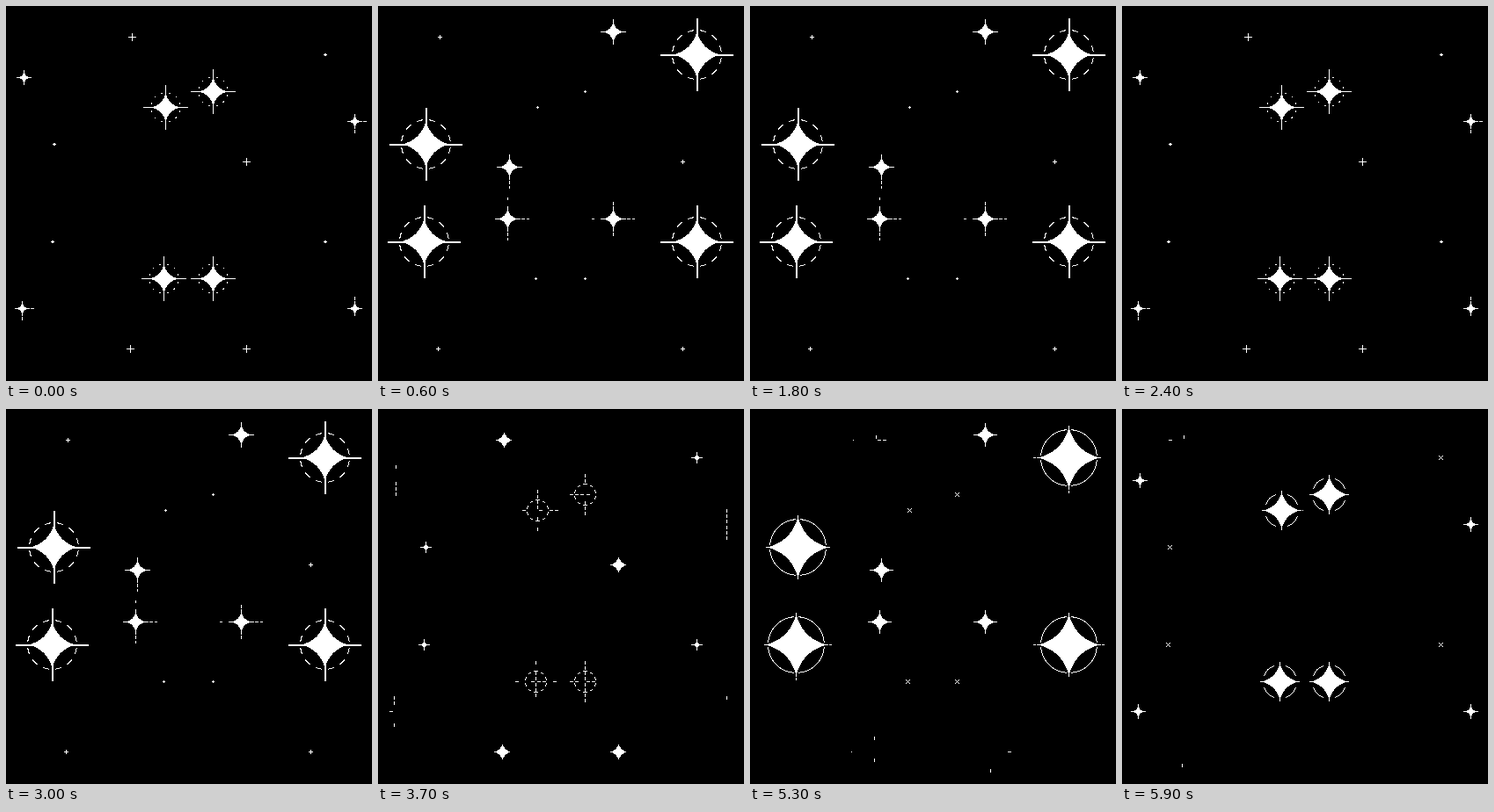
An HTML page for the animation above (6010 ms loop, 416 by 427 pixels).

```html
<!DOCTYPE html>
<html lang="en">
<head>
<meta charset="utf-8">
<title>Twinkling stars</title>
<style>
  html, body { margin: 0; width: 100%; height: 100%; overflow: hidden; background: #000; }
  svg { display: block; width: 416px; height: 427px; shape-rendering: crispEdges; }
</style>
</head>
<body>
<svg viewBox="0 0 416 427">
  <path id="solid" fill="#fff"/>
  <path id="rings" fill="none" stroke="#fff"/>
</svg>
<script>
const LOOP = 6010, STEP = 100, PHASES = 12, LAST = 59;

// Poses per phase; lengths are for scale 1.
const BIG = [
  { core: 2, bend: .5 },
  { core: 4, bend: .3, ray: 6 },
  { core: 9, ray: 12 },
  { core: 14, ray: 20 },
  { core: 21, bend: .17, ray: 26, dash: 40, keep: .7, ring: 25, arcs: 8, fill: .13 },
  { core: 35, ray: 36, dash: 40, keep: .3, ring: 32, arcs: 4, fill: .9 },
  { core: 27, ray: 41, ring: 28, arcs: 12, fill: .5 },
  { dash: 43, keep: .8, ring: 20, arcs: 10, fill: .9 },
  { dash: 41, keep: .5, ring: 12, arcs: 8, fill: .7 },
  { ray: 9 },
  { ray: 6 },
  { cross: 2 }
];
const SMALL = [
  {}, {}, {},
  { ray: 3 },
  { core: 7.5, bend: .25 },
  { core: 11, ray: 13 },
  { core: 11, ray: 14, dash: 24, keep: .6 },
  { dash: 30, keep: .45 },
  { dash: 22, keep: .2 },
  {}, {}, {}
];

const STARS = [
  { x: 235, y: 310, poses: BIG, size: .6, shift: 6 },
  { x: 362, y: 268, poses: BIG, size: 1, shift: 0 },
  { x: 267, y: 242, poses: SMALL, size: 1, shift: 0 },
  { x: 396, y: 344, poses: SMALL, size: .6, shift: 6 },
  { x: 273, y: 390, poses: SMALL, size: 1.2, shift: 3 },
  { x: 346, y: 390, poses: SMALL, size: .8, shift: 9 }
];
const TILES = [
  (x, y) => [x, y],
  (x, y) => [x, y - 213],
  (x, y) => [414 - x, y],
  (x, y) => [416 - x, 425 - y]
];
const ARMS = [[1, 0], [0, 1], [-1, 0], [0, -1]];

const random = n => {
  const v = Math.sin(n * 12.9898) * 43758.5453;
  return v - Math.floor(v);
};
const rect = (x, y, w, h) => `M${x} ${y}h${w}v${h}h${-w}z`;

// Straight piece of one arm, from distance a to b.
function bar(x, y, [dx, dy], a, b, w = 1) {
  a = Math.round(a);
  b = Math.round(b);
  const len = b - a + 1;
  return dx ? rect(dx > 0 ? x + a : x - b, y, len, w)
            : rect(x, dy > 0 ? y + a : y - b, w, len);
}

function core(x, y, r, bend = .2) {
  const k = r * bend, cx = x + .5, cy = y + .5;
  return `M${cx} ${cy - r}Q${cx + k} ${cy - k} ${cx + r} ${cy}` +
    `Q${cx + k} ${cy + k} ${cx} ${cy + r}Q${cx - k} ${cy + k} ${cx - r} ${cy}` +
    `Q${cx - k} ${cy - k} ${cx} ${cy - r}z`;
}

// Broken arms; the level ones are sparser.
function dashes(x, y, from, to, keep, seed) {
  let d = '';
  ARMS.forEach((arm, i) => {
    const chance = arm[0] ? keep * .6 : keep;
    for (let a = from, n = 0; a < to; a += 6, n++)
      if (random(seed + i * 17 + n) < chance) d += bar(x, y, arm, a, Math.min(a + 3, to));
  });
  return d;
}

function ring(x, y, r, arcs, fill) {
  const turn = 2 * Math.PI / arcs, half = turn * Math.min(fill, .95) / 2;
  const at = a => `${x + .5 + r * Math.cos(a)} ${y + .5 + r * Math.sin(a)}`;
  let d = '';
  for (let i = 0; i < arcs; i++) {
    const mid = (i + .5) * turn;
    d += `M${at(mid - half)}A${r} ${r} 0 0 1 ${at(mid + half)}`;
  }
  return d;
}

function draw(phase) {
  let solid = '', rings = '';
  STARS.forEach((star, i) => TILES.forEach((place, j) => {
    const s = star.size, pose = star.poses[(phase + star.shift) % PHASES];
    const [x, y] = place(star.x, star.y);
    const ray = (pose.ray || 0) * s;
    if (pose.core) solid += core(x, y, pose.core * s, pose.bend);
    if (ray) for (const arm of ARMS) solid += bar(x, y, arm, 0, ray, ray > 36 ? 2 : 1);
    if (pose.dash) solid += dashes(x, y, ray + 2, pose.dash * s, pose.keep, phase * 7 + i * 101 + j * 31);
    if (pose.ring) rings += ring(x, y, pose.ring * s, pose.arcs, pose.fill * s);
    if (pose.cross)
      for (let k = -pose.cross; k <= pose.cross; k++)
        solid += rect(x + k, y + k, 1, 1) + rect(x + k, y - k, 1, 1);
  }));
  return { solid, rings };
}

const views = Array.from({ length: PHASES }, (_, p) => draw(p));
const solidPath = document.getElementById('solid');
const ringPath = document.getElementById('rings');
const start = performance.now();
let shown = -1;

function tick() {
  const t = (performance.now() - start) % LOOP;
  const phase = Math.min(LAST, Math.floor(t / STEP)) % PHASES;
  if (phase !== shown) {
    shown = phase;
    solidPath.setAttribute('d', views[phase].solid);
    ringPath.setAttribute('d', views[phase].rings);
  }
  requestAnimationFrame(tick);
}
tick();
</script>
</body>
</html>
```
